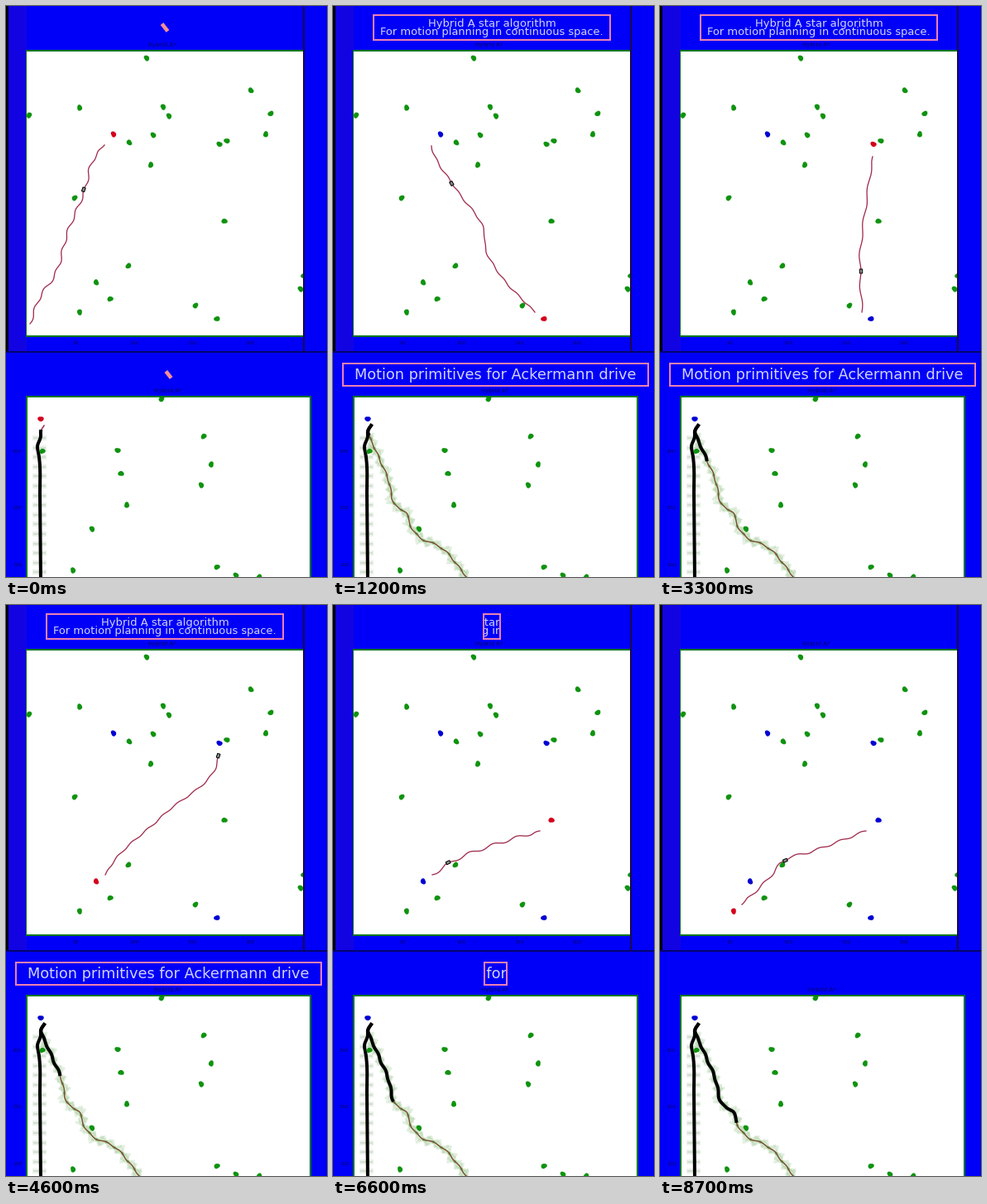
Animation, 388 px wide and 690 px high, one loop 8800 ms. Source, as a matplotlib script:

```python
import numpy as np
import matplotlib.pyplot as plt
from matplotlib.animation import FuncAnimation
from matplotlib.patches import Polygon, Rectangle

W, H, DPI = 388, 690, 64
FRAMES, STEP = 88, 100
PT = 72 / DPI  # points per pixel
CAR_SPEED, TRAIL_SPEED, TURN = 12.5, 1.62, 5  # pixels per frame; frame of the turn

BLUE, GREEN, RED, VISITED = "#0000f8", "#0f930f", "#d4001c", "#0000d2"
PINK, BAR, CRIMSON, BROWN = "#ee80b0", "#f38f96", "#a02c4c", "#76502c"
BORDER, DARK = "#0a761e", "#06066e"

rng = np.random.default_rng(4)
plt.rcParams["font.family"] = "DejaVu Sans"

fig = plt.figure(figsize=(W / DPI, H / DPI), dpi=DPI, facecolor=BLUE)
ax = fig.add_axes([0, 0, 1, 1])
ax.set_xlim(0, W)
ax.set_ylim(H, 0)
ax.axis("off")


# ---------- helpers ----------
def box(x0, y0, x1, y1, color, z=1):
    r = Rectangle((x0, y0), x1 - x0, y1 - y0, fc=color, ec="none", lw=0, zorder=z)
    return ax.add_patch(r)


def label(x, y, text, px, color, **kw):
    return ax.text(x, y, text, fontsize=px * PT, color=color, ha="center", **kw)


class Track:
    """Smooth curve through key points with a steering wobble, addressed by distance."""

    def __init__(self, points, wobble=0, period=24):
        p = np.array(points, float)
        t = np.concatenate([[0], np.cumsum(np.hypot(*np.diff(p, axis=0).T))])
        m = np.gradient(p, t, axis=0)
        q = np.linspace(0, t[-1], int(t[-1]) + 1)
        k = np.clip(np.searchsorted(t, q, side="right") - 1, 0, len(t) - 2)
        h = (t[k + 1] - t[k])[:, None]
        u = (q - t[k])[:, None] / h
        xy = ((1 + 2 * u) * (1 - u)**2 * p[k] + u * (1 - u)**2 * h * m[k]
              + u**2 * (3 - 2 * u) * p[k + 1] + u**2 * (u - 1) * h * m[k + 1])
        dx, dy = np.gradient(xy, axis=0).T
        normal = np.column_stack([-dy, dx]) / np.maximum(np.hypot(dx, dy), 0.1)[:, None]
        swing = wobble * np.sin(2 * np.pi * q / period) * np.clip((t[-1] - q) / 10, 0, 1)
        self.xy = xy + normal * swing[:, None]
        self.s = np.concatenate([[0], np.cumsum(np.hypot(*np.diff(self.xy, axis=0).T))])
        self.length = self.s[-1]

    def at(self, d):
        return np.array([np.interp(d, self.s, c) for c in self.xy.T])

    def upto(self, d):
        return np.vstack([self.xy[self.s < d], self.at(d)])

    def heading(self, d):
        a, b = self.at(d - 2), self.at(d + 2)
        return np.arctan2(b[1] - a[1], b[0] - a[0])


def rotated(cx, cy, w, h, angle):
    q = np.array([[-w, -h], [w, -h], [w, h], [-w, h]]) / 2
    c, s = np.cos(angle), np.sin(angle)
    return q @ np.array([[c, s], [-s, c]]) + [cx, cy]


def blob(x, y, clip, color=GREEN):
    t = np.linspace(0, 2 * np.pi, 30, endpoint=False)
    f, g = rng.uniform(0, 2 * np.pi, 2)
    r = 3.3 + 0.4 * np.sin(2 * t + f) + 0.2 * np.sin(3 * t + g)
    p = Polygon(np.column_stack([x + r * np.cos(t), y + r * np.sin(t)]),
                fc=color, ec="none", zorder=6)
    ax.add_patch(p)
    p.set_clip_path(clip)
    return p


# ---------- backdrop ----------
box(3, 0, 25, 417, "#1204e2")
box(0, 0, 3, 417, "#000008")
box(359, 0, 361, 417, "#1c0a48", 3)
box(0, 417, W, 419, "#04046e", 3)
box(24, 53, 360, 400, BORDER, 2)
top = box(25, 55, 359, 398, "white", 2)
box(24, 471, 369, H, BORDER, 2)
low = box(26, 473, 367, H, "white", 2)

for x, y in [(188.5, 48.5), (195.5, 466.5)]:
    label(x, y, "Hybrid A*", 7, DARK)
for k in range(4):
    label(84.5 + 70.2 * k, 409, str(50 * (k + 1)), 6, DARK)
for k in range(3):
    label(13.5, 540 + 68.5 * k, str(200 - 50 * k), 6, DARK)

# ---------- obstacles and goals ----------
for x, y in [(170, 63), (296, 102), (28, 132), (89, 123), (190, 122), (197, 133),
             (320, 130), (178, 156), (149, 165), (267, 163), (314, 155), (175, 192),
             (83, 232), (148, 314), (126, 354), (229, 362), (356, 342), (360, 326)]:
    blob(x, y, top)
for x, y in [(188, 475), (239, 520), (248, 554), (135, 537), (44, 538), (139, 565),
             (236, 579), (146, 603), (104, 632), (81, 682), (255, 678), (278, 688),
             (306, 690)]:
    blob(x, y, low)
goals = [blob(x, y, top) for x, y in [(130, 155), (255, 378), (258, 167),
                                      (109, 334), (264, 260), (89, 370)]]
low_goal = blob(42, 499, low, RED)

# ---------- upper routes ----------
climb = Track([(29, 384), (42, 350), (58, 327), (75, 272), (95, 223), (106, 185),
               (119, 168)], 1.5, 26)
descent = Track([(119, 169), (121, 176), (150, 223), (183, 274), (184, 292), (200, 322),
                 (244, 370)], 0.8)
rise = Track([(244, 370), (242, 300), (249, 240), (257, 182)], 1.2, 40)
back = Track([(257, 181), (256, 188), (190, 254), (124, 319), (120, 326)], 0.8)
east = Track([(120, 326), (148, 308), (194, 290), (250, 273)], 1.8, 30)
west = Track([(249, 273), (205, 290), (183, 298), (148, 310), (136, 325), (99, 362)],
             1.2, 27)

# (frame at which the car sets off, route)
legs = [(62 / CAR_SPEED - climb.length / CAR_SPEED, climb), (7.8, descent), (29, rise),
        (45.9, back), (64, east), (78.5, west)]

route, = ax.plot([], [], color=CRIMSON, lw=1.3 * PT, zorder=5)
car = ax.add_patch(Polygon(np.zeros((4, 2)), fc="#8c8c8c", ec="black", lw=PT, zorder=7))

# ---------- lower route ----------
column = Track([(42, 695), (41, 600), (40, 545), (38, 532), (42, 520), (42, 514), (46, 507)])
plan = Track([(46, 507), (43, 514), (50, 533), (66, 570), (79, 607), (89, 612), (91, 621),
              (102, 640), (130, 654), (163, 692)], 0.8, 22)

for y in np.arange(522, H, 11.6):
    ax.plot([35, 46], [y, y], color="#9fbf98", alpha=0.2, lw=6 * PT, zorder=3)
    ax.plot([34, 47], [y, y], color="#7f9f7a", alpha=0.22, lw=2 * PT, zorder=3)

halo = []
for d in np.arange(18, plan.length, 12):
    p, a = plan.at(d), plan.heading(d)
    for turn in (-0.8, -0.4, 0.4, 0.8):
        for sign in (-1, 1):
            v = sign * rng.uniform(5, 9) * np.array([np.cos(a + turn), np.sin(a + turn)])
            line, = ax.plot([p[0], p[0] + v[0]], [p[1], p[1] + v[1]], color="#6fb062",
                            alpha=0.2, lw=3 * PT, zorder=3)
            line.set_clip_path(low)
            halo.append(line)

plan_line, = ax.plot([], [], lw=1.5 * PT, zorder=4)
past, = ax.plot([], [], color="black", lw=4 * PT, zorder=5)
trail, = ax.plot([], [], color="black", lw=4 * PT, zorder=5)


# ---------- banners ----------
class Banner:
    def __init__(self, cx, cy, w, h, lines):
        self.geom = cx, cy, w, h
        self.frame = ax.add_patch(Polygon(np.zeros((4, 2)), lw=2 * PT, joinstyle="miter",
                                          zorder=8))
        self.texts = [label(cx, y, s, px, "#d2d2fa", zorder=9, clip_on=True)
                      for y, s, px in lines]

    def draw(self, grow, spread):
        cx, cy, w, h = self.geom
        self.frame.set_visible(grow > 0.1)
        wide = max(spread * w, 4.6)
        is_open = wide > 6
        angle = np.radians(260 * (1 - grow)**1.38)
        self.frame.set_xy(rotated(cx, cy, wide - 2, h * grow - 2, angle))
        self.frame.set_facecolor("none" if is_open else BAR)
        self.frame.set_edgecolor(PINK if is_open else BAR)
        view = Rectangle((cx - wide / 2 + 2, cy - h / 2), max(wide - 4, 0.1), h,
                         transform=ax.transData)
        for t in self.texts:
            t.set_visible(is_open)
            t.set_clip_path(view)


banners = [
    Banner(192, 26, 288, 32, [(24.7, "Hybrid A star algorithm", 13.1),
                              (34.8, "For motion planning in continuous space.", 12.95)]),
    Banner(196.5, 445.5, 371, 29, [(451, "Motion primitives for Ackermann drive", 17.7)]),
]


def quint(u):
    u = np.clip(u, 0, 1)
    return 16 * u**5 if u < 0.5 else 1 - 16 * (1 - u)**5


def banner_state(ms):
    """A bar spins up and then opens; the close mirrors it."""
    grow = np.sin(np.pi / 2 * np.clip(min(ms + 90, 7320 - ms) / 390, 0, 1))
    return grow, quint(min(ms - 375, 6893 - ms) / 850)


# ---------- animation ----------
def update(i):
    n = sum(start <= i for start, _ in legs) - 1
    start, path = legs[n]
    d = min(CAR_SPEED * (i - start), path.length)
    route.set_data(*path.xy.T)
    car.set_xy(rotated(*path.at(d), 5, 3.4, path.heading(d)))
    for j, g in enumerate(goals):
        g.set_facecolor(VISITED if j < n else RED if j == n else GREEN)

    planned = i > TURN
    low_goal.set_facecolor(VISITED if planned else RED)
    plan_line.set_data(*(plan if planned else column).xy.T)
    plan_line.set_color(BROWN if planned else CRIMSON)
    for line in halo:
        line.set_visible(planned)
    run = TRAIL_SPEED * (i - TURN)
    past.set_data(*column.upto(column.length + min(run, 0)).T)
    trail.set_data(*plan.upto(max(run, 0)).T)

    for b in banners:
        b.draw(*banner_state(i * STEP))
    return []


anim = FuncAnimation(fig, update, frames=FRAMES, interval=STEP, repeat=True, repeat_delay=0,
                     blit=False)
plt.show()
```
